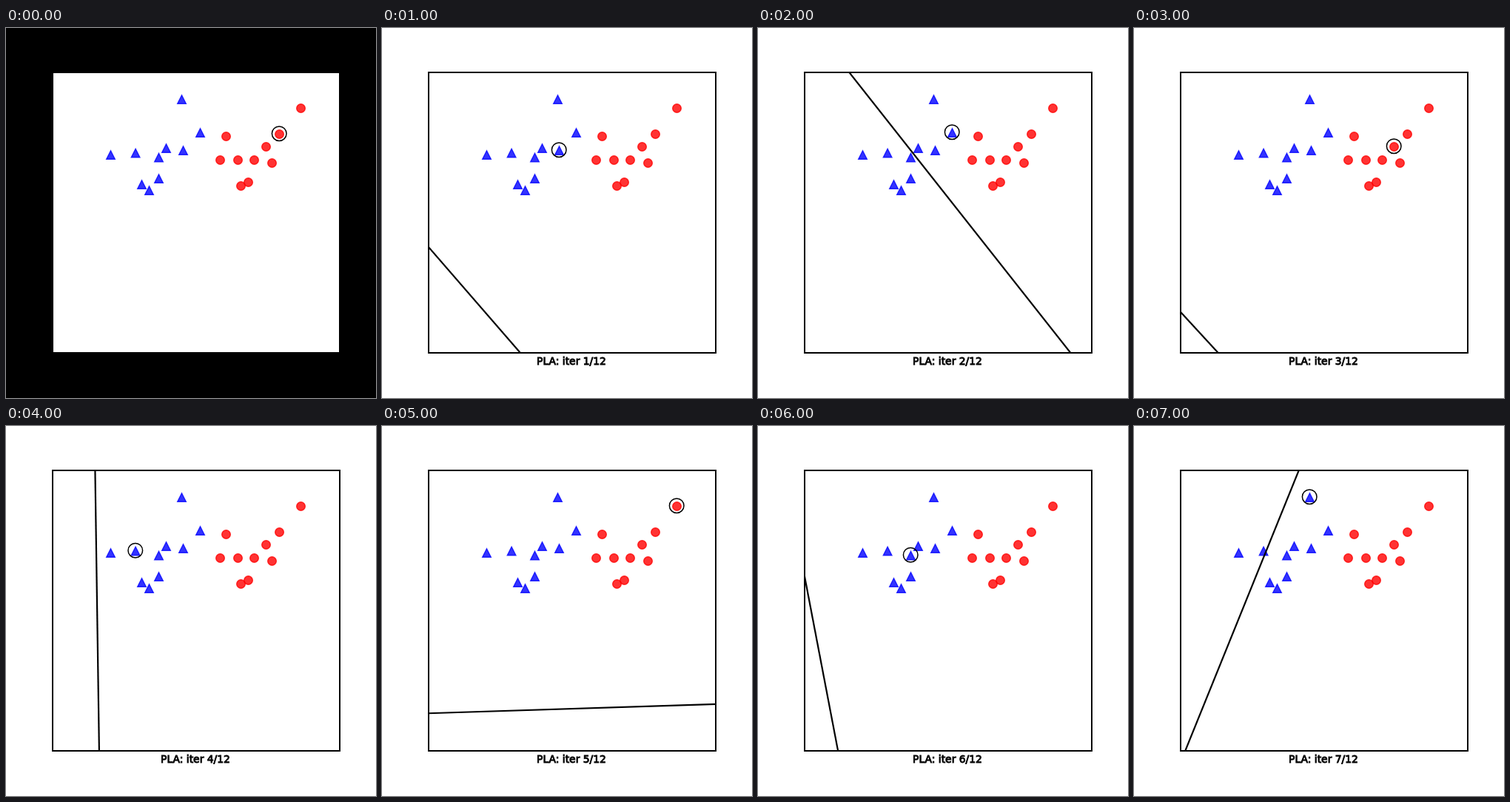
An HTML page with a canvas for the animation above (8 s loop, 500 px wide and 500 px high).

```html
<!DOCTYPE html>
<html lang="en">
<head>
<meta charset="utf-8">
<title>Perceptron learning</title>
<style>
html, body { margin: 0; width: 100%; height: 100%; overflow: hidden; background: #fff; }
canvas { display: block; }
</style>
</head>
<body>
<canvas id="stage" width="500" height="500"></canvas>
<script>
const ctx = document.getElementById('stage').getContext('2d');
const STEP_MS = 1000, STEPS = 8, SIZE = 5.8;
const LEFT = 63, BOTTOM = 439, WIDTH = 388, HEIGHT = 379;

// Training points in the order the perceptron visits them.
const points = [
  [369, 143], [239, 165], [262, 141], [351, 160], [174.6, 168.5],
  [398, 108], [206, 174.5], [237, 96], [216, 162], [141, 171],
  [206, 203], [183, 211], [193, 219], [297, 146], [289, 178],
  [313, 178], [335, 178], [359, 182], [327, 208], [317, 213]
];
const label = ([x]) => x > 275 ? 1 : -1;

// The axes span 0..6 across and -2..4 upwards.
const toData = ([x, y]) => [(x - LEFT) * 6 / WIDTH, (BOTTOM - y) * 6 / HEIGHT - 2];
const toStage = (x, y) => [LEFT + x * WIDTH / 6, BOTTOM - (y + 2) * HEIGHT / 6];

// Weights (bias, x, y) after each update w += label * (1, x, y).
const weights = [[-1.7, -1.587, -0.022]];
for (let i = 0; i < STEPS - 1; i++) {
  const features = [1, ...toData(points[i])];
  weights.push(weights[i].map((w, k) => w + label(points[i]) * features[k]));
}

function circle(x, y, radius) {
  ctx.beginPath();
  ctx.arc(x, y, radius, 0, Math.PI * 2);
}

function triangle(x, y, half) {
  ctx.beginPath();
  ctx.moveTo(x, y - half);
  ctx.lineTo(x + half, y + half);
  ctx.lineTo(x - half, y + half);
  ctx.closePath();
}

function drawPoint(point) {
  const isRed = label(point) > 0;
  const shape = isRed ? circle : triangle;
  shape(point[0] + 0.5, point[1] + 0.5, SIZE);
  ctx.fillStyle = ctx.strokeStyle = isRed ? 'rgba(255,0,0,.8)' : 'rgba(0,0,255,.8)';
  ctx.lineWidth = 1.4;
  ctx.fill();
  ctx.stroke();
}

// The line bias + wx * x + wy * y = 0, cut off at the axes.
function drawBoundary([bias, wx, wy]) {
  const norm = Math.hypot(wx, wy);
  const at = t => toStage((-bias * wx / norm - t * wy) / norm, (-bias * wy / norm + t * wx) / norm);
  ctx.save();
  ctx.beginPath();
  ctx.rect(LEFT, BOTTOM - HEIGHT, WIDTH, HEIGHT);
  ctx.clip();
  ctx.beginPath();
  ctx.moveTo(...at(-20));
  ctx.lineTo(...at(20));
  ctx.lineWidth = 2.2;
  ctx.stroke();
  ctx.restore();
}

function drawLabel(text) {
  ctx.font = '13.89px "DejaVu Sans", sans-serif';
  ctx.textAlign = 'center';
  ctx.lineWidth = 0.9;
  ctx.fillText(text, 256, 455);
  ctx.strokeText(text, 256, 455);
}

function draw(step) {
  ctx.fillStyle = step ? '#fff' : '#000';
  ctx.fillRect(0, 0, 500, 500);
  ctx.fillStyle = '#fff';
  ctx.fillRect(LEFT + 1, BOTTOM - HEIGHT + 1, WIDTH - 2, HEIGHT - 2);
  points.forEach(drawPoint);

  ctx.fillStyle = ctx.strokeStyle = '#000';
  const [x, y] = points[step];
  circle(x + 0.2, y - 0.3, 9.8);
  ctx.lineWidth = 1.5;
  ctx.stroke();
  drawBoundary(weights[step]);
  ctx.lineWidth = 2;
  ctx.strokeRect(LEFT, BOTTOM - HEIGHT, WIDTH, HEIGHT);
  drawLabel(`PLA: iter ${step}/12`);
}

const start = performance.now();
function tick() {
  draw(Math.floor((performance.now() - start) / STEP_MS) % STEPS);
  requestAnimationFrame(tick);
}
tick();
</script>
</body>
</html>
```
